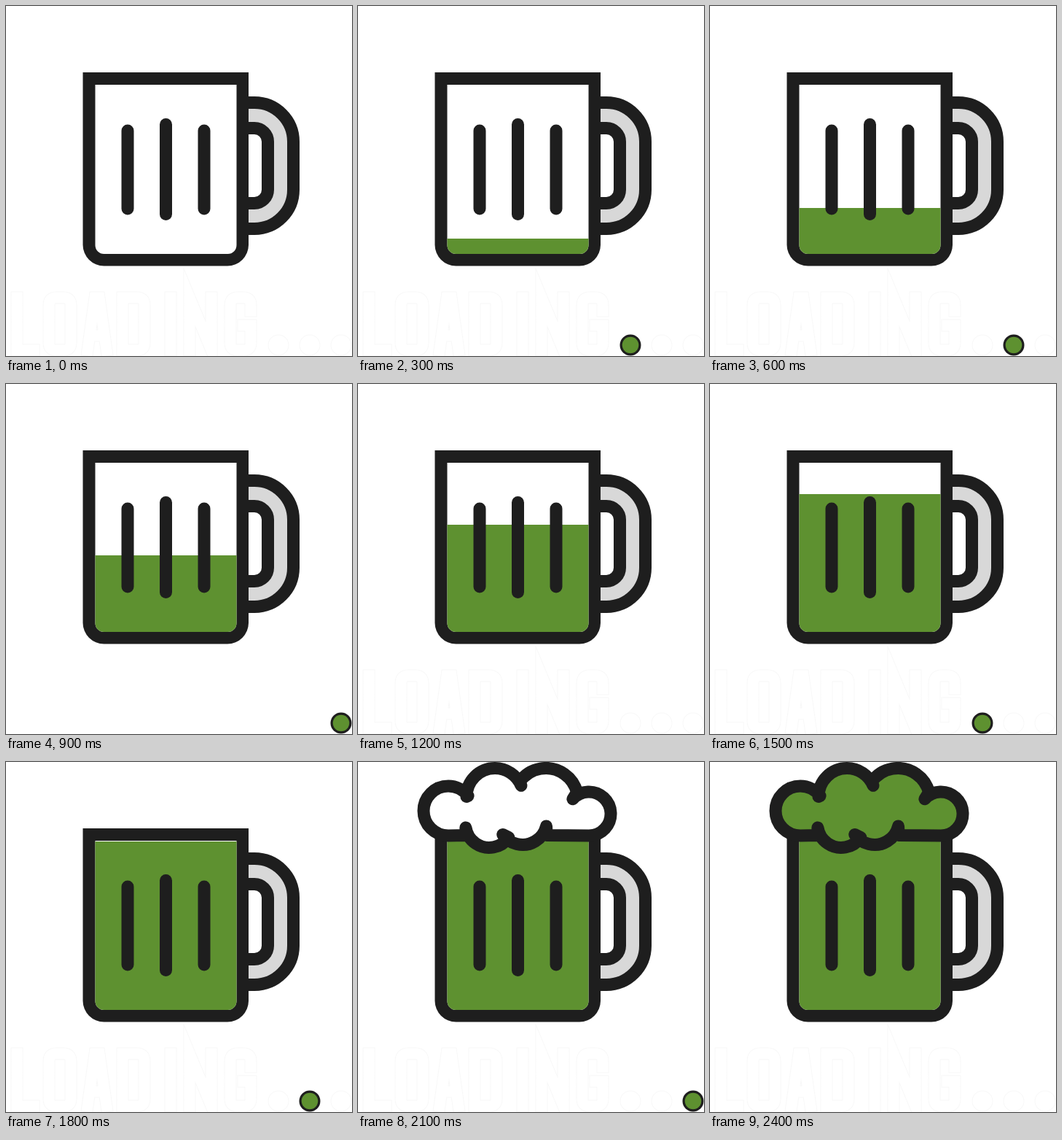
An HTML page with a canvas that plays this animation: 475 px wide and 480 px high, repeating every 2700 ms.

```html
<!DOCTYPE html>
<html lang="en">
<head>
<meta charset="utf-8">
<title>Loading</title>
<style>
  html, body { margin: 0; width: 100%; height: 100%; overflow: hidden; background: #fff; }
  canvas { display: block; }
</style>
</head>
<body>
<canvas id="stage" width="475" height="480" role="img" aria-label="LOADING..."></canvas>
<script>
const ctx = document.getElementById('stage').getContext('2d');
const INK = '#1e1e1e', GREEN = '#5e9130', GREY = '#d8d8d8', WHITE = '#fff', FAINT = '#f8f8f8';
const STEP = 300, STEPS = 9;
const RIM = 108, BASE = 340;
const DOTS = [374, 417, 460];

const handle = new Path2D('M320 150H341A36 36 0 0 1 377 186V252A36 36 0 0 1 341 288H320');

// Condensed display lettering, as centre lines
const letters = new Path2D([
  'M15 400V472H38',
  'M59 410Q59 400 69 400H79Q89 400 89 410V462Q89 472 79 472H69Q59 472 59 462Z',
  'M112 472L122 400H128L138 472M116 452H134',
  'M160 400H180Q190 400 190 410V462Q190 472 180 472H160Z',
  'M226 400V472',
  'M252 472V400L282 472V400',
  'M336 418V410Q336 400 326 400H318Q308 400 308 410V462Q308 472 318 472H326Q336 472 336 462V438H326'
].join(''));

const foam = new Path2D();
foam.arc(124, 67, 34, Math.PI / 2, -0.65);
foam.arc(188, 47.5, 39, Math.PI, -0.4);
foam.arc(258, 52.5, 44, -2.53, -0.25);
foam.arc(317, 71, 30, -2.4, Math.PI / 2);
foam.lineTo(259, 100.5);
foam.arc(226, 80, 33.5, 0.24, 2.52);
foam.arc(180, 85, 32.5, 0.6, 2.99);
foam.lineTo(148, 100.5);
foam.closePath();

function stroke(path, width, color, cap = 'butt') {
  ctx.lineWidth = width;
  ctx.strokeStyle = color;
  ctx.lineCap = cap;
  ctx.stroke(path);
}

function box(x, y, w, h, radii, color) {
  ctx.beginPath();
  ctx.roundRect(x, y, w, h, radii);
  ctx.fillStyle = color;
  ctx.fill();
}

function disc(x, r, color) {
  ctx.beginPath();
  ctx.arc(x, 465, r, 0, 2 * Math.PI);
  ctx.fillStyle = color;
  ctx.fill();
}

function drawMug(level) {
  ctx.lineJoin = 'round';
  stroke(handle, 52, INK);
  stroke(handle, 18, GREY);
  box(105.5, 91, 227.5, 265.5, [0, 0, 29, 29], INK);
  box(122.5, RIM, 194, BASE - RIM, [0, 0, 12, 12], WHITE);
  if (level < BASE) box(122.5, level, 194, BASE - level, [0, 0, 12, 12], GREEN);
  box(158.5, 162.5, 17, 124, 8.5, INK);
  box(211, 154, 17, 140, 8.5, INK);
  box(263.5, 162.5, 17, 124, 8.5, INK);
}

function drawFoam(color) {
  ctx.lineJoin = 'round';
  ctx.fillStyle = color;
  ctx.fill(foam);
  stroke(foam, 17, INK);
}

function drawCaption() {
  ctx.lineJoin = 'miter';
  stroke(letters, 17, FAINT, 'square');
  stroke(letters, 15, WHITE, 'square');
  for (const x of DOTS) {
    disc(x, 14.5, FAINT);
    disc(x, 13.5, WHITE);
  }
}

function draw(step) {
  ctx.fillStyle = WHITE;
  ctx.fillRect(0, 0, 475, 480);
  drawMug(step ? Math.max(RIM, 361 - 42 * step) : BASE);
  if (step >= 7) drawFoam(step === 7 ? WHITE : GREEN);
  if (step !== 3) drawCaption();
  const active = step % 4 - 1;
  if (active >= 0) {
    disc(DOTS[active], 14.5, INK);
    disc(DOTS[active], 11.3, GREEN);
  }
}

const start = performance.now();
function tick() {
  draw(Math.floor((performance.now() - start) / STEP) % STEPS);
  requestAnimationFrame(tick);
}
tick();
</script>
</body>
</html>
```
